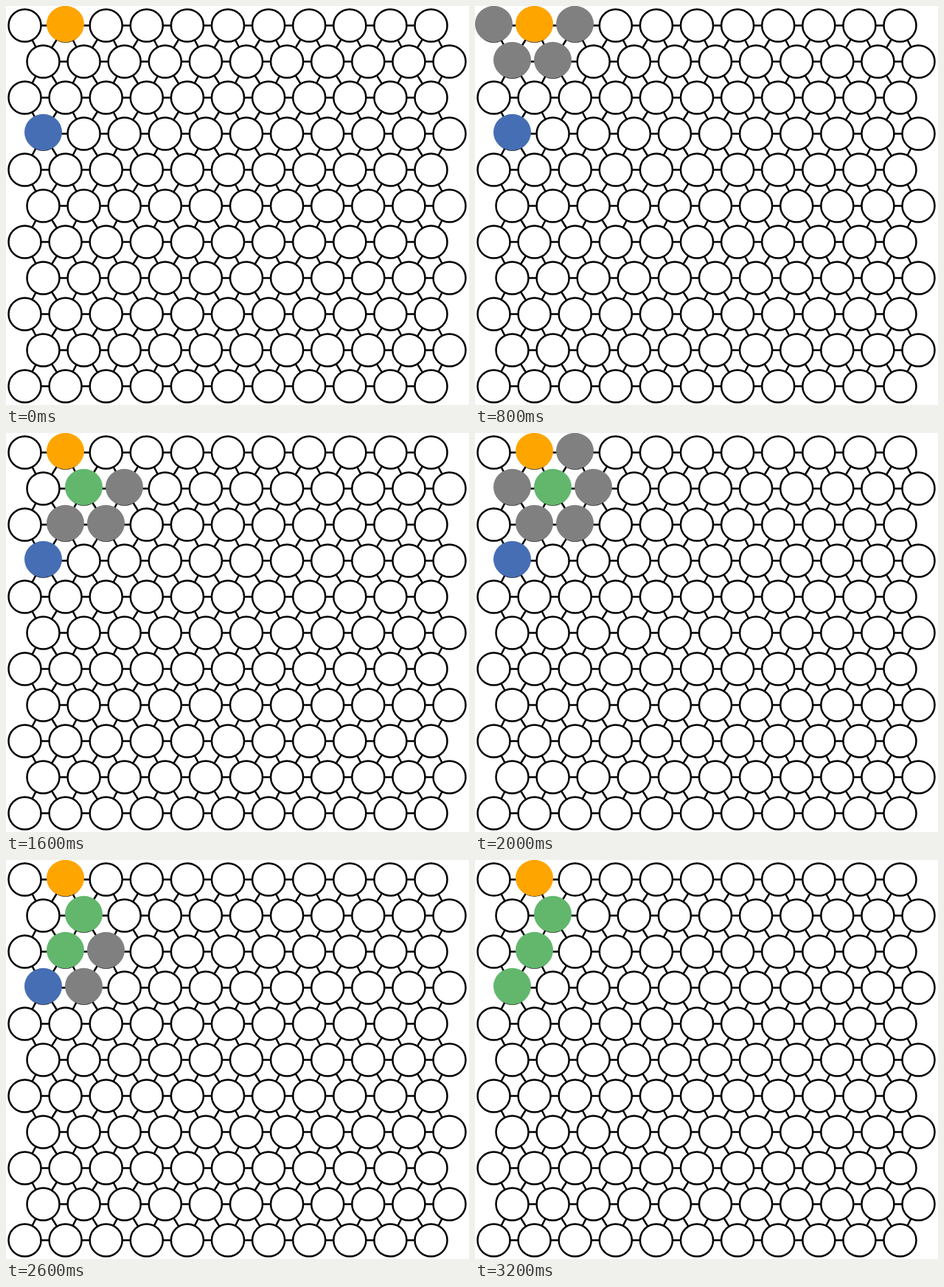
Animation of 628 by 542 pixels, one loop 3400 ms. Source, as an HTML page:

```html
<!DOCTYPE html>
<html lang="en">
<head>
<meta charset="utf-8">
<title>Path search on a hexagonal grid</title>
<style>
  html, body { margin: 0; width: 100%; height: 100%; overflow: hidden; background: #fff; }
  svg { display: block; width: 628px; height: 542px; }
  .node { fill: #fff; stroke: #000; stroke-width: 2.5; }
  .edge { fill: none; stroke: #000; stroke-width: 2.5; }
</style>
</head>
<body>
<svg id="stage" viewBox="0 0 628 542"></svg>
<script>
  const NS = 'http://www.w3.org/2000/svg';
  const COLS = 11, ROWS = 11, STEP = 200, LOOP = 3400;
  const ORANGE = '#ffa500', BLUE = '#466eb4', GRAY = '#808080', GREEN = '#62b76d';
  const stage = document.getElementById('stage');

  const nodeX = (row, col) => (row % 2 ? 50.5 : 25.5) + col * 55.1;
  const nodeY = row => 26.5 + row * 49;

  function add(name, attrs) {
    const el = document.createElementNS(NS, name);
    for (const key in attrs) el.setAttribute(key, attrs[key]);
    return stage.appendChild(el);
  }

  function drawGrid() {
    let path = '';
    const link = (r1, c1, r2, c2) => {
      if (r2 >= ROWS || c2 < 0 || c2 >= COLS) return;
      path += `M${nodeX(r1, c1)} ${nodeY(r1)}L${nodeX(r2, c2)} ${nodeY(r2)}`;
    };
    for (let r = 0; r < ROWS; r++) {
      for (let c = 0; c < COLS; c++) {
        const left = r % 2 ? c : c - 1;
        link(r, c, r, c + 1);
        link(r, c, r + 1, left);
        link(r, c, r + 1, left + 1);
      }
    }
    add('path', { class: 'edge', d: path });
    for (let r = 0; r < ROWS; r++) {
      for (let c = 0; c < COLS; c++) {
        add('circle', { class: 'node', cx: nodeX(r, c), cy: nodeY(r), r: 22 });
      }
    }
  }

  // A disc is visible from step `from` up to, but not including, step `to`.
  const discs = [];
  function disc(row, col, color, from = 0, to = LOOP / STEP) {
    const el = add('ellipse', {
      cx: (row % 2 ? 50.5 : 25.5) + col * 55, cy: 24.5 + row * 49,
      rx: 25.5, ry: 24.7, fill: color
    });
    discs.push({ el, from, to });
  }

  // Each round probes neighbours one by one, then settles on the next node.
  const rounds = [
    { start: 1, probes: [[0, 2], [1, 1], [1, 0], [0, 0]], pick: [1, 1] },
    { start: 6, probes: [[1, 2], [2, 2], [2, 1], [1, 0], [0, 2]], pick: [2, 1] },
    { start: 12, probes: [[2, 2], [3, 1], [2, 0], [1, 0]], pick: [3, 0] }
  ];

  drawGrid();
  disc(0, 1, ORANGE);
  disc(3, 0, BLUE, 0, 16);
  for (const { start, probes, pick } of rounds) {
    const end = start + probes.length;
    probes.forEach(([r, c], i) => disc(r, c, GRAY, start + i, end));
    disc(...pick, GREEN, end);
  }

  let shown = -1;
  function frame() {
    const step = Math.floor(performance.now() % LOOP / STEP);
    if (step !== shown) {
      shown = step;
      for (const { el, from, to } of discs) {
        el.style.display = step >= from && step < to ? '' : 'none';
      }
    }
    requestAnimationFrame(frame);
  }
  frame();
</script>
</body>
</html>
```
